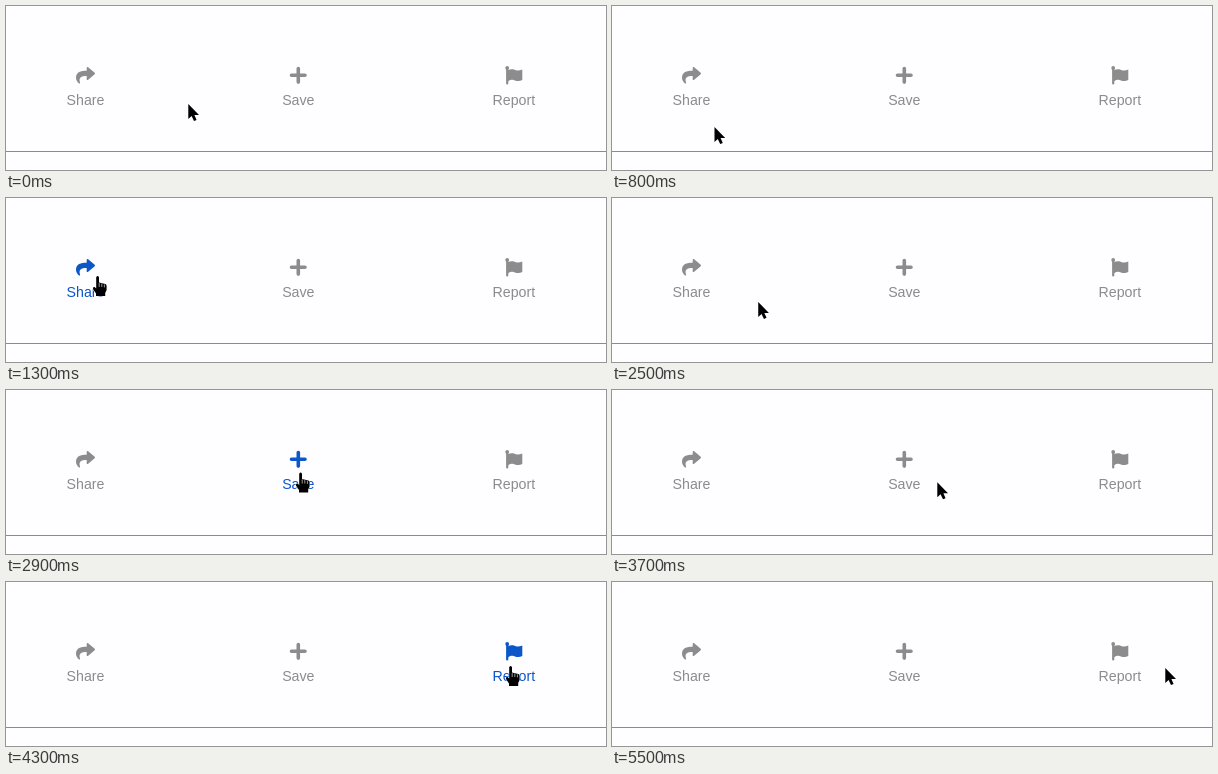
Recreate the animation shown at these times as an HTML page. Size 600 by 164 pixels, loop 7.8 s.

```html
<!DOCTYPE html>
<html lang="en">
<head>
<meta charset="utf-8">
<style>
  html, body { margin: 0; width: 100%; height: 100%; overflow: hidden; background: #fefdff; }
  svg { display: block; }
  text { font: 14.2px "Liberation Sans", Arial, sans-serif; text-anchor: middle; }
  .action { color: #8c8c8c; fill: currentColor; }
  .action.hover { color: #0b57c8; }
  .pointer { stroke: #fff; stroke-linejoin: round; paint-order: stroke; }
</style>
</head>
<body>
<svg width="600" height="164" viewBox="0 0 600 164">
  <rect y="145" width="600" height="1" fill="#8b8b8b"/>

  <g class="action" data-x="79.5">
    <path transform="translate(70 59.8) scale(.0371)" d="M504 190L328 38C312 25 288 35 288 56v80C127 138 0 170 0 322c0 62 40 122 83 154 14 10 33-2 28-18C66 313 133 274 288 272v88c0 21 24 31 40 18l176-152c11-9 11-27 0-36z"/>
    <text x="79.5" y="99">Share</text>
  </g>
  <g class="action" data-x="292.3">
    <path d="M285.5 69.3H299M292.3 62.5V76.1" stroke="currentColor" stroke-width="3.6" stroke-linecap="round"/>
    <text x="292.3" y="99">Save</text>
  </g>
  <g class="action" data-x="507.8">
    <circle cx="501.2" cy="62" r="1.9"/>
    <path d="M501.2 62V77.4" stroke="currentColor" stroke-width="2.2" stroke-linecap="round"/>
    <path d="M502 64.3C505 62.4 508 63.4 510 64.2S514 64.4 516.3 63.4V74C513.5 75.6 511 75.2 509 74.4S505 73.6 502 75.2Z"/>
    <text x="507.8" y="99">Report</text>
  </g>

  <path id="arrow" class="pointer" d="M.3 0V15L3.6 12L6 17L8.6 15.9L6.4 11H11Z"/>
  <g id="hand" class="pointer">
    <path d="M-1.8 1.2Q-.4-1 1 1.2V6.4L7.4 8Q8.6 8.6 8.6 10V14L7.2 17V20H-2V17.6L-5 13Q-5.4 10.6-3.4 11L-1.8 12.6Z"/>
    <path d="M1.2 7V11M3.8 7.6V11M6.4 8.4V11.4" stroke-width=".6"/>
  </g>
</svg>
<script>
const LOOP = 7800, STEP = 100;

// The pointer follows one cubic Bezier curve per move, in whole steps.
const moves = [
  { start: 600, steps: 8, curve: [[182, 98], [130, 135], [-16, 128], [92, 78]] },
  { start: 2500, steps: 5, curve: [[92, 78], [185, 138], [265, 108], [295, 82.5]] },
  { start: 3700, steps: 7, curve: [[295, 82.5], [365, 109], [435, 109], [505, 84]] },
  { start: 5500, steps: 1, curve: [[505, 84], [505, 84], [553, 86], [553, 86]] }
];

const actions = [...document.querySelectorAll(".action")];
const arrow = document.getElementById("arrow");
const hand = document.getElementById("hand");

function bezier([a, b, c, d], t) {
  const u = 1 - t;
  return [0, 1].map(i =>
    u * u * u * a[i] + 3 * u * u * t * b[i] + 3 * u * t * t * c[i] + t * t * t * d[i]);
}

function pointerAt(time) {
  const { start, steps, curve } = moves.findLast(m => m.start <= time) ?? moves[0];
  const step = Math.floor((time - start) / STEP) + 1;
  return bezier(curve, Math.max(0, Math.min(step / steps, 1)));
}

function draw(time) {
  const [x, y] = pointerAt(time);
  const hovered = actions.find(a => Math.abs(x - a.dataset.x) < 30 && y < 104);

  for (const action of actions) action.classList.toggle("hover", action === hovered);
  for (const pointer of [arrow, hand]) {
    pointer.setAttribute("transform", `translate(${x} ${y})`);
    pointer.style.display = (pointer === hand) === Boolean(hovered) ? "" : "none";
  }
}

const origin = performance.now();
function tick() {
  draw((performance.now() - origin) % LOOP);
  requestAnimationFrame(tick);
}
tick();
</script>
</body>
</html>
```
